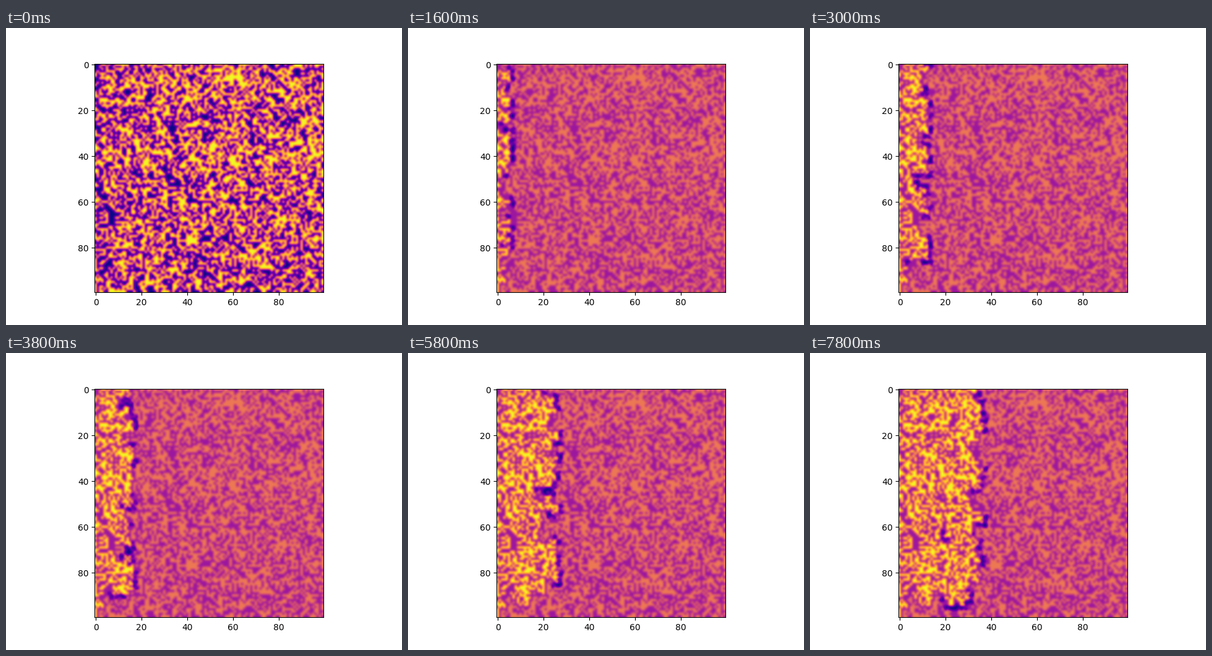
These frames come from a looping animation (640x480 px, 8 s). A matplotlib script:

```python
import numpy as np
import matplotlib.pyplot as plt
from matplotlib.animation import FuncAnimation

SIZE = 100
STEPS = 40
BURN_TIME = 2
FIRE, EMPTY, TREE, ASH = -1, 0, 1, 2

# Winding gaps in the forest that hold the fire back: first row, last row, column
GAPS = [
    (61, 68, 4), (36, 47, 17), (55, 61, 19), (95, 99, 17),
    (25, 31, 33), (42, 53, 31), (94, 99, 32),
]


def plant(rng):
    rows = np.arange(SIZE)
    density = np.full(SIZE, 0.49)
    for center in (8, 36, 67):
        density += 0.06 * np.exp(-((rows - center) / 8) ** 2)
    forest = np.where(rng.random((SIZE, SIZE)) < density[:, None], TREE, EMPTY)
    for top, bottom, col in GAPS:
        for row in range(top, bottom + 1):
            nxt = col + rng.integers(-1, 2)
            forest[row, min(col, nxt):max(col, nxt) + 1] = EMPTY
            col = nxt
    return forest


def near(mask):
    """Cells that touch the mask, diagonals included."""
    p = np.pad(mask, 1)
    return np.any([p[i:i + SIZE, j:j + SIZE]
                   for i in range(3) for j in range(3)], axis=0)


def ignition_times(forest):
    """Step at which each tree catches fire, starting from the left edge."""
    times = np.full(forest.shape, STEPS + 1)
    times[forest[:, 0] == TREE, 0] = 1
    for step in range(2, STEPS):
        fresh = near(times == step - 1) & (forest == TREE) & (times > step)
        times[fresh] = step
    return times


forest = plant(np.random.default_rng(7))
times = ignition_times(forest)


def state(step):
    grid = forest.copy()
    grid[times <= step] = FIRE
    grid[times + BURN_TIME <= step] = ASH
    return grid


fig, ax = plt.subplots(figsize=(6.4, 4.8), dpi=100)
image = ax.imshow(state(0), cmap="plasma", interpolation="bicubic")


def update(step):
    image.set_data(state(step))
    image.autoscale()
    return [image]


anim = FuncAnimation(fig, update, frames=STEPS, interval=200,
                     repeat=True, repeat_delay=0, blit=False)
plt.show()
```
